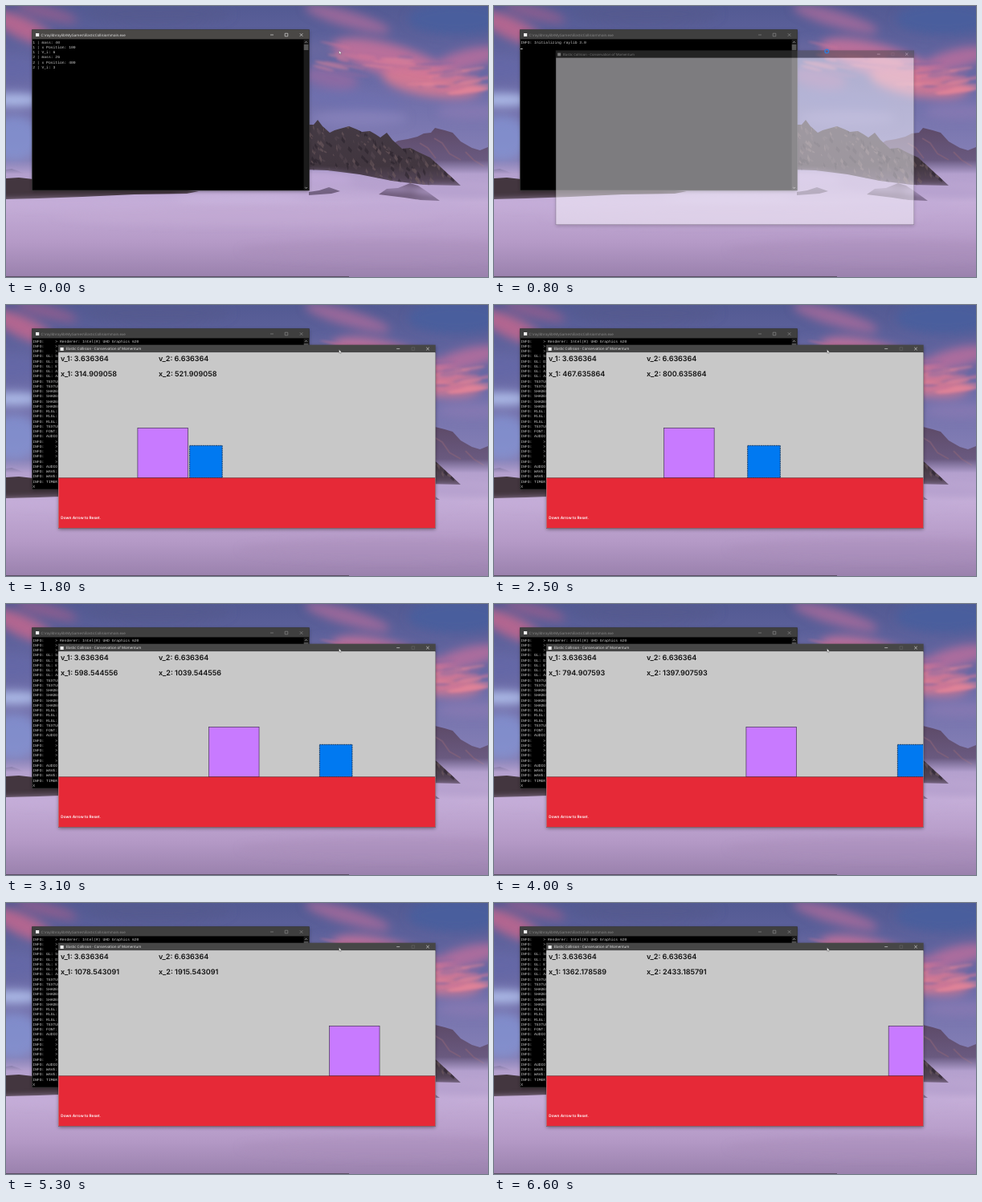
These frames come from a looping animation (600 by 338 pixels, 6700 ms). An HTML page:

```html
<!DOCTYPE html>
<html lang="en">
<head>
<meta charset="utf-8">
<title>Elastic Collision</title>
<style>
html, body { margin: 0; width: 100%; height: 100%; overflow: hidden; background: #6b6aa4; }
svg { display: block; width: 600px; height: 338px; }
text { white-space: pre; text-rendering: geometricPrecision; }
.title { font: 4.47px "Open Sans", "Noto Sans", sans-serif; }
.log { font: 4.7px "Liberation Mono", "DejaVu Sans Mono", monospace; fill: #ccc; }
.hud { font: 600 9px Inter, Roboto, sans-serif; fill: #111; }
.hint { font: 600 4.75px Inter, Roboto, sans-serif; fill: #fff; }
.icon { fill: none; stroke: #e8e8e8; stroke-width: .6; }
</style>
</head>
<body>
<svg viewBox="0 0 600 338" xmlns="http://www.w3.org/2000/svg">
  <defs>
    <linearGradient id="sky" x2="0" y2="1">
      <stop offset="0" stop-color="#535a93"/>
      <stop offset=".3" stop-color="#6c6ca8"/>
      <stop offset=".62" stop-color="#8b84b9"/>
      <stop offset="1" stop-color="#a794c4"/>
    </linearGradient>
    <linearGradient id="fog" x2="0" y2="1">
      <stop offset="0" stop-color="#a99bcb" stop-opacity="0"/>
      <stop offset=".12" stop-color="#b39fcd"/>
      <stop offset=".36" stop-color="#c5aed8"/>
      <stop offset=".7" stop-color="#b59ac7"/>
      <stop offset="1" stop-color="#9a81ad"/>
    </linearGradient>
    <linearGradient id="rock" x2="0" y2="1">
      <stop offset="0" stop-color="#443a44"/>
      <stop offset=".7" stop-color="#41363f"/>
      <stop offset="1" stop-color="#5a4a60"/>
    </linearGradient>
    <linearGradient id="far" x2="0" y2="1">
      <stop offset="0" stop-color="#5d4a68"/>
      <stop offset="1" stop-color="#72648f"/>
    </linearGradient>
    <filter id="soft" x="-50%" y="-50%" width="200%" height="200%"><feGaussianBlur stdDeviation="6"/></filter>
    <filter id="wisp" x="-20%" y="-20%" width="140%" height="140%"><feGaussianBlur stdDeviation="1.5"/></filter>
    <filter id="mist" x="-50%" y="-80%" width="200%" height="260%"><feGaussianBlur stdDeviation="4"/></filter>
    <filter id="drop" x="-10%" y="-10%" width="120%" height="125%"><feGaussianBlur stdDeviation="2"/></filter>
    <clipPath id="ridge"><path id="ridgeLine" d="M340 156L377 148L383 148L388 142L394 150L403 158L409 155L416 153L427 150L437 154L443 157L453 156L460 160L466 164L474 158L481 167L493 178L503 177L515 183L528 189L540 200L552 211L566 224L520 223L480 218L440 210L400 205L340 203Z"/></clipPath>
    <clipPath id="client"><rect x="65.5" y="59.4" width="468.75" height="218.75"/></clipPath>
  </defs>

  <rect width="600" height="338" fill="url(#sky)"/>
  <g id="clouds" filter="url(#soft)"></g>
  <g id="wisps" filter="url(#wisp)"></g>
  <path d="M470 178L488 168L500 166L512 163L520 159L529 158L534 152L546 155L556 158L566 169L580 177L590 180L600 176V218H470Z" fill="url(#far)"/>
  <path d="M533 165L543 171L552 184L566 192M515 171L525 177L535 190M572 182L582 192L595 200" fill="none" stroke="#8a6478" stroke-width="2" opacity=".55"/>
  <path d="M0 204L7 203L16 206L24 210L33 214V222H0Z" fill="#474a74"/>
  <rect y="192" width="600" height="146" fill="url(#fog)"/>
  <path d="M0 215L16 214L34 216L120 222L210 229L240 231L225 234L160 235L95 238L40 240L0 241Z" fill="#43363f"/>
  <use href="#ridgeLine" fill="url(#rock)"/>
  <g id="facets" clip-path="url(#ridge)"></g>
  <path d="M464 235L474 228L488 227L503 221L513 224L525 232L540 243L516 242L496 239Z" fill="#5d4c68" opacity=".85"/>
  <path d="M377 232L390 230L402 226L416 231L405 234L377 236Z" fill="#5b4b67" opacity=".75"/>
  <g id="mists" filter="url(#mist)"></g>
  <rect y="337" width="427" height="1" fill="#5c5065"/>

  <g id="console">
    <rect x="33" y="31" width="344" height="200" fill="#000" opacity=".4" filter="url(#drop)"/>
    <rect x="32.5" y="29.7" width="345" height="200.3" fill="#000" stroke="#3c3c3c" stroke-width=".6"/>
    <rect id="bar" x="32.5" y="29.7" width="345" height="11.7"/>
    <rect x="37" y="34" width="4.2" height="4" fill="#eee"/>
    <text id="path" class="title" x="43.5" y="37.7">C:\raylib\raylib\MyGames\ElasticCollision\main.exe</text>
    <path id="consoleIcons" class="icon" d="M329 36H333M347.2 34.2h3.6v3.6h-3.6zM365.8 34.2l3.6 3.6m0-3.6l-3.6 3.6"/>
    <rect x="370.6" y="41.4" width="6.2" height="188" fill="#1b1b1b"/>
    <rect x="370.8" y="48" width="5.6" height="7" fill="#555"/>
    <path class="icon" d="M372.2 45.8l1.4-1.4 1.4 1.4M372.2 226l1.4 1.4 1.4-1.4" stroke="#aaa"/>
    <g id="log"></g>
    <rect id="caret" x="33" y="53" width="2.7" height=".9" fill="#ddd"/>
  </g>

  <g id="game">
    <rect x="65.5" y="51" width="469" height="229" fill="#000" opacity=".4" filter="url(#drop)"/>
    <rect x="65" y="49.7" width="469.7" height="229" fill="#464646"/>
    <rect x="67.5" y="53" width="4.2" height="4" fill="#eee"/>
    <text class="title" x="74.4" y="56.4" fill="#eee">Elastic Collision - Conservation of Momentum</text>
    <path class="icon" d="M486.2 54.6h4M523.2 52.8l3.6 3.6m0-3.6l-3.6 3.6"/>
    <path class="icon" d="M505 52.8h3.6v3.6h-3.6z" style="stroke:#656565"/>
    <rect x="65.5" y="59.4" width="468.75" height="218.75" fill="#faf7fd"/>
    <g id="scene" clip-path="url(#client)">
      <rect x="65" y="59" width="470" height="158" fill="#c8c8c8"/>
      <rect id="box1" y="153.4" width="62.5" height="62.4" fill="#c87aff" stroke="#3d2a4c" stroke-width=".65"/>
      <rect id="box2" y="175.3" width="40.6" height="40.5" fill="#0079f1" stroke="#06254a" stroke-width=".8" stroke-dasharray="2 .7"/>
      <rect x="65" y="215.7" width="470" height="63" fill="#e62937"/>
      <path d="M65 215.6H535" stroke="#5e2027" stroke-width=".6"/>
      <text id="v1" class="hud" x="68" y="70.2"></text>
      <text id="v2" class="hud" x="190" y="70.2"></text>
      <text id="x1" class="hud" x="68" y="89"></text>
      <text id="x2" class="hud" x="190" y="89"></text>
      <text class="hint" x="68.3" y="267">Down Arrow to Reset.</text>
    </g>
  </g>
  <path id="arrow" d="M414.6 55.6V60L415.6 59.1L416.3 60.7L417 60.4L416.3 58.9H417.6Z" fill="#fff" stroke="#222" stroke-width=".25"/>
  <circle id="busy" cx="414.3" cy="56.4" r="2.3" fill="none" stroke="#2f7fdc" stroke-width="1.3"/>
</svg>
<script>
const LOOP = 6700, STEP = 100, SCALE = 0.3125, LEFT = 65.5;
// Step numbers at which each stage of the launch begins
const INIT = 4, OPEN = 8, LOADED = 10, PLAY = 12;
const $ = id => document.getElementById(id);

let seed = 7;
const rand = () => (seed = seed * 16807 % 2147483647) / 2147483647;

// Each blob: x, y, radius x, radius y, tilt, colour, opacity
const blob = ([x, y, rx, ry, tilt, fill, opacity]) =>
  `<ellipse cx="${x}" cy="${y}" rx="${rx}" ry="${ry}" transform="rotate(${tilt} ${x} ${y})" fill="${fill}" opacity="${opacity}"/>`;

$('clouds').innerHTML = [
  [22, 28, 46, 13, 25, '#bd6890', .9],
  [50, 8, 40, 8, 15, '#96608f', .8],
  [8, 78, 30, 14, 0, '#6468a8', .8],
  [10, 117, 34, 8, 0, '#b3c2ee', .9],
  [10, 165, 32, 28, 0, '#8496d6', .7],
  [190, 10, 90, 14, 0, '#565a8e', .7],
  [425, 16, 55, 10, 16, '#a96b9c', .8],
  [560, 16, 60, 20, 0, '#4a5f9e', .9],
  [400, 55, 30, 12, 0, '#6a689f', .8],
  [480, 68, 75, 20, 16, '#c8729a', .85],
  [530, 95, 62, 18, 8, '#d97b92', .85],
  [575, 66, 42, 12, -14, '#bd6f9d', .8],
  [405, 90, 34, 12, 10, '#9a6ba2', .7],
  [430, 118, 62, 12, 6, '#6e70b0', .8],
  [580, 132, 44, 10, 0, '#8b7bb4', .7],
  [440, 140, 60, 10, 0, '#8e88c0', .6]
].map(blob).join('');

// Fine streaks following the lit clouds
let wisps = '';
for (let i = 0; i < 46; i++) {
  const u = rand(), x = 395 + u * 205, y = 46 + u * 34 + rand() * 34;
  wisps += blob([x, y, 8 + rand() * 20, 1 + rand() * 2, 14 - u * 24,
    ['#e88698', '#8a69a0', '#cf7698'][i % 3], .5]);
}
$('wisps').innerHTML = wisps;

$('mists').innerHTML = [
  [392, 215, 40, 7, 3, '#c0aad8', .85],
  [470, 226, 44, 4, 5, '#b49ecc', .8],
  [560, 232, 55, 7, 2, '#b6a0ce', .85],
  [90, 247, 130, 6, 0, '#c3acd8', .85],
  [290, 240, 80, 5, 0, '#cab4de', .8],
  [500, 249, 70, 5, 0, '#c0a9d6', .8],
  [300, 262, 240, 12, 0, '#c4a9d3', .55],
  [480, 305, 190, 14, 0, '#a78db9', .4]
].map(blob).join('');

let facets = '';
for (let i = 0; i < 260; i++) {
  const x = 372 + rand() * 190, y = 144 + rand() * 76;
  const w = 1 + rand() * 4, h = 3 + rand() * 8;
  const fill = ['#28222b', '#715d62', '#574850'][i % 3];
  facets += `<path d="M${x} ${y}l${w} ${h * .6}l${-w * .3} ${h * .4}l${-w} ${-h * .5}z" fill="${fill}" opacity=".55"/>`;
}
$('facets').innerHTML = facets;

const prompts = ['1 | mass: 40', '1 | x Position: 100', '1 | V_i: 6',
  '2 | mass: 26', '2 | x Position: 400', '2 | V_i: 3'];
const info = `Initializing raylib 3.0
DISPLAY: Device ready
    > Display size
    > Render size
    > Screen size
    > Viewport
GLAD: Loaded
GL: OpenGL
GL: OpenGL
    > Vendor: Intel
    > Renderer: Intel(R) UHD Graphics 620
    > Version
    > GLSL
GL: Supported
GL: DXT
GL: ETC
GL: ASTC
GL: Anisotropic
TEXTURE: Loaded
TEXTURE: Loaded
SHADER: Compiled
SHADER: Compiled
SHADER: Loaded
SHADER: Loaded
RLGL: Buffers
RLGL: Buffers
RLGL: State
TEXTURE: Loaded
FONT: Loaded
AUDIO: Device
    > Backend
    > Format
    > Channels
    > Sample rate
    > Periods size
AUDIO: Loaded
WAVE: Loaded
WAVE: Unloaded
TIMER: Target`.split('\n').map(s => 'INFO: ' + s);

const toHtml = rows => rows.map((row, i) =>
  `<text class="log" x="33.2" y="${46.7 + i * 6.25}">${row.replace('>', '&gt;')}</text>`).join('');
const logs = [
  [PLAY, [...info, 'X'].slice(-30)],
  [LOADED, info.slice(0, 29)],
  [INIT, info.slice(0, 1)],
  [0, prompts]
].map(([from, rows]) => ({ from, html: toHtml(rows) }));

// Single-precision simulation at 60 ticks per second
const f32 = Math.fround;
const states = [];
{
  const m1 = 40, m2 = 26;
  let x1 = 100, x2 = 400, v1 = 6, v2 = 3;
  for (let i = 0; i < 340; i++) {
    states.push({ x1, x2, v1, v2 });
    x1 = f32(x1 + v1);
    x2 = f32(x2 + v2);
    if (v1 > v2 && x1 + 200 >= x2) {
      const a = ((m1 - m2) * v1 + 2 * m2 * v2) / (m1 + m2);
      const b = (2 * m1 * v1 + (m2 - m1) * v2) / (m1 + m2);
      v1 = f32(a);
      v2 = f32(b);
    }
  }
}

const show = (id, on) => $(id).style.display = on ? '' : 'none';

function draw(step) {
  const open = step >= OPEN, playing = step >= PLAY;
  $('log').innerHTML = logs.find(l => step >= l.from).html;
  $('bar').setAttribute('fill', open ? '#3f3f3f' : '#4a4846');
  $('path').setAttribute('fill', open ? '#8d8d8d' : '#f0f0f0');
  $('consoleIcons').style.stroke = open ? '#929292' : '#eee';
  show('caret', step >= INIT && !playing);
  show('game', open);
  show('scene', playing);
  show('busy', open && !playing);
  show('arrow', !open || playing);

  const shown = Math.min(1, .5 + (step - OPEN) * .4);
  $('game').setAttribute('opacity', shown);
  $('game').setAttribute('transform', `translate(300 164) scale(${.9 + shown * .1}) translate(-300 -164)`);

  if (!playing) return;
  const s = states[1 + (step - PLAY) * 6];
  for (const key of ['v1', 'v2', 'x1', 'x2'])
    $(key).textContent = `${key[0]}_${key[1]}: ${s[key].toFixed(6)}`;
  $('box1').setAttribute('x', LEFT + s.x1 * SCALE);
  $('box2').setAttribute('x', LEFT + s.x2 * SCALE);
}

let last = -1;
function tick() {
  const step = Math.floor(performance.now() % LOOP / STEP);
  if (step !== last) draw(last = step);
  requestAnimationFrame(tick);
}
tick();
</script>
</body>
</html>
```
